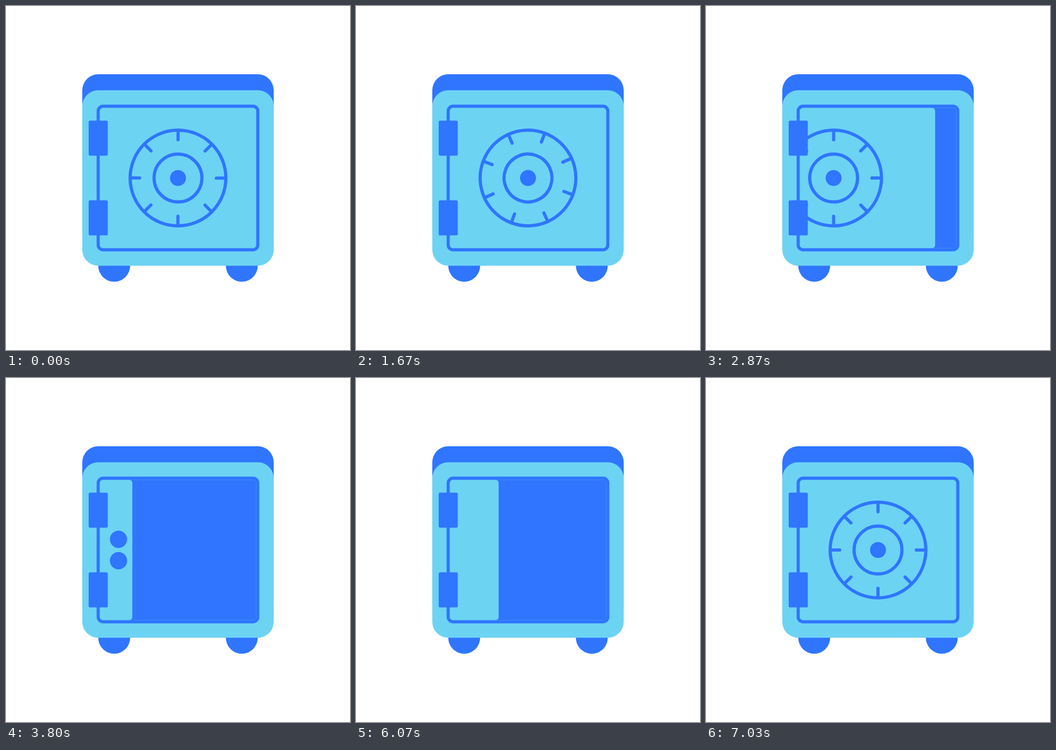
Animation of 640 by 640 pixels, one loop 7210 ms. Source, as an HTML page:

```html
<!DOCTYPE html>
<html lang="en">
<head>
<meta charset="utf-8">
<title>Safe</title>
<style>
  html, body { margin: 0; width: 100%; height: 100%; overflow: hidden; background: #fff; }
  svg { display: block; width: 100%; height: 100%; }
  .dark { fill: #2f75ff; }
  .light { fill: #6dd3f3; }
  .line { fill: none; stroke: #2f75ff; stroke-width: .2; stroke-linecap: round; }
</style>
</head>
<body>
<svg viewBox="0 0 640 640">
  <defs>
    <clipPath id="opening"><rect x="-4.9" y="-4.4" width="9.8" height="8.8" rx=".2"/></clipPath>
  </defs>
  <!-- one unit is a twelfth of the safe's width -->
  <g transform="translate(320 320) scale(29.68)">
    <circle class="dark" cx="-4" cy="5.5" r="1"/>
    <circle class="dark" cx="4" cy="5.5" r="1"/>
    <rect class="dark" x="-6" y="-6.5" width="12" height="11" rx="1"/>
    <rect class="light" x="-6" y="-5.5" width="12" height="11" rx="1"/>
    <rect class="line" x="-5" y="-4.5" width="10" height="9" rx=".3"/>
    <rect class="dark" x="-4.9" y="-4.4" width="9.8" height="8.8" rx=".2"/>
    <rect class="light" id="door" x="-4.9" y="-4.4" width="9.8" height="8.8" rx=".2"/>
    <g clip-path="url(#opening)">
      <g id="dial">
        <circle class="line" r="3"/>
        <circle class="line" r="1.5"/>
        <circle class="dark" r=".5"/>
        <path class="line" id="ticks"/>
      </g>
    </g>
    <circle class="dark" id="upper" cx="-3.73" cy="-.67" r="0"/>
    <circle class="dark" id="lower" cx="-3.73" cy=".67" r="0"/>
    <rect class="dark" x="-5.6" y="-3.6" width="1.2" height="2.2" rx=".1"/>
    <rect class="dark" x="-5.6" y="1.4" width="1.2" height="2.2" rx=".1"/>
  </g>
</svg>
<script>
const LOOP = 7210;
const SPIN = { time: 2250, angle: 270 };
const SLIDE = { open: 2285, close: 5529, time: 1500, door: 7.76, dial: 16.39 };
const BOLT = { upper: 3370, lower: 3500, hide: 5400, time: 300, radius: .54 };

const [door, dial, ticks, upper, lower] =
  ["door", "dial", "ticks", "upper", "lower"].map(id => document.getElementById(id));

const progress = (t, start, time) => Math.min(1, Math.max(0, (t - start) / time));
const smooth = p => p * p * (3 - 2 * p);

// cubic-bezier(.8, 0, .2, 1)
function glide(x) {
  if (x <= 0 || x >= 1) return x;
  let low = 0, high = 1;
  for (let i = 0; i < 30; i++) {
    const s = (low + high) / 2, r = 1 - s;
    if (2.4 * s * r * r + .6 * s * s * r + s * s * s < x) low = s;
    else high = s;
  }
  return smooth(low);
}

ticks.setAttribute("d", Array.from({ length: 8 }, (_, i) => {
  const a = i * Math.PI / 4, c = Math.cos(a), s = Math.sin(a);
  return `M${2.4 * c} ${2.4 * s}L${2.95 * c} ${2.95 * s}`;
}).join(""));

function boltRadius(t, start) {
  const shown = smooth(progress(t, start, BOLT.time)) - smooth(progress(t, BOLT.hide, BOLT.time));
  return BOLT.radius * shown;
}

function draw(t) {
  const slide = glide(progress(t, SLIDE.open, SLIDE.time)) - glide(progress(t, SLIDE.close, SLIDE.time));
  const angle = SPIN.angle * progress(t, 0, SPIN.time);
  door.setAttribute("width", 9.8 - SLIDE.door * slide);
  dial.setAttribute("transform", `translate(${-SLIDE.dial * slide} 0) rotate(${angle})`);
  upper.setAttribute("r", boltRadius(t, BOLT.upper));
  lower.setAttribute("r", boltRadius(t, BOLT.lower));
}

const begin = performance.now();
function tick() {
  draw((performance.now() - begin) % LOOP);
  requestAnimationFrame(tick);
}
tick();
</script>
</body>
</html>
```
